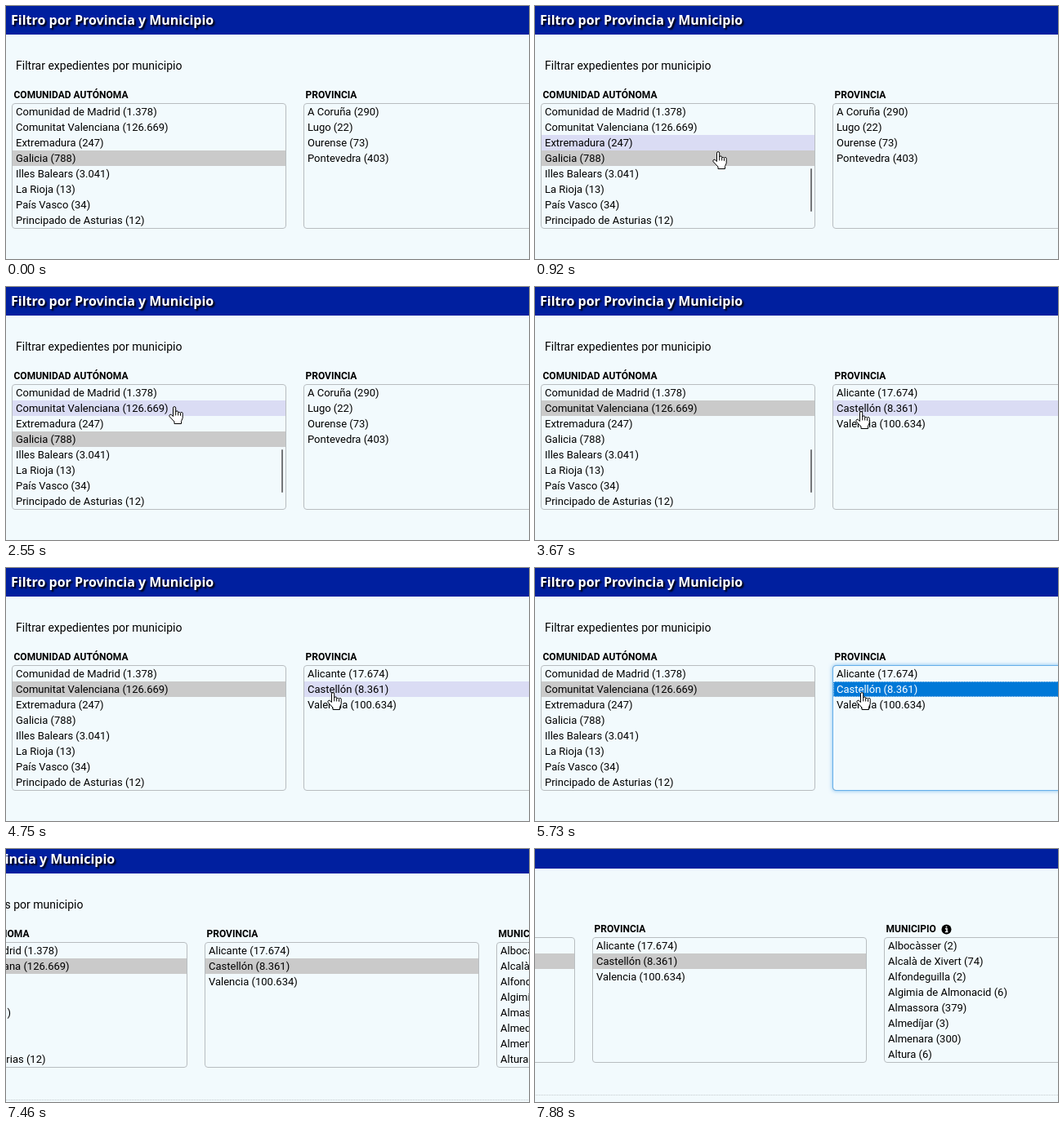
Animation, 640 px wide and 310 px high, one loop 8 s. Source, as an HTML page:

```html
<!DOCTYPE html>
<html lang="es">
<head>
<meta charset="utf-8">
<title>Filtro por Provincia y Municipio</title>
<style>
  :root { --hover: #dadcf4; --picked: #cacaca; --focus: #0078d7; }
  html, body { margin: 0; width: 100%; height: 100%; overflow: hidden; background: #f2fafd; }
  body { position: relative; font: 13px/19px Roboto, sans-serif; color: #000; }
  .stage { position: absolute; left: 0; top: 0; width: 640px; height: 310px; overflow: hidden; }
  .stage *, .stage { box-sizing: border-box; }
  .page, .page > *, .bar, .thumb, .options, .cursor, .cursor svg { position: absolute; }
  .page { left: 0; top: 0; width: 1100px; height: 340px; }

  header { left: 0; top: 0; width: 100%; height: 35px; background: #001f9f; }
  h1 { margin: 0; position: absolute; left: 6px; top: 6px; white-space: nowrap; color: #fff;
       font: bold 16px/22px "Open Sans", "Noto Sans", sans-serif; text-shadow: 2px 2px 2px #000; }
  .intro { margin: 0; left: 12px; top: 63px; font-size: 14px; line-height: 20px; white-space: nowrap; }
  .rule { left: 0; top: 312px; width: 100%; border-top: 1px dotted #c4cbce; }

  .field { top: 100px; width: 336px; }
  .field h2 { margin: 0 0 0 2.5px; font-size: 12px; line-height: 19px; font-weight: bold; white-space: nowrap; }
  .field h2 svg { position: absolute; left: 70px; top: 3px; }
  .list { position: relative; height: 154px; border: 1px solid #b8bdc0; border-radius: 4px; overflow: hidden; }
  .options { margin: 0; padding: 0 0 0 4px; left: 0; top: 0; list-style: none; white-space: nowrap; }
  .bar { left: 0; width: 100%; height: 19px; }
  .thumb { right: 3px; top: 79px; width: 2px; height: 53px; border-radius: 1px; background: #747678; }
  .glow { position: absolute; inset: 19px 0 0; border: 1px solid #66afe9; border-radius: 4px;
          box-shadow: 0 0 5px rgba(82, 168, 236, .75); }

  /* Every part shares one 8 s clock and changes in hard steps. */
  .anim { animation: 8s step-end -4ms infinite; }
  .page.anim { animation-name: pan; }
  .picked { top: 57px; background: var(--picked); animation-name: picked !important; }
  .hover { background: var(--hover); opacity: 0; animation-name: hover !important; }
  .thumb { opacity: 0; animation-name: thumb !important; }
  .before { animation-name: before !important; }
  .after { opacity: 0; animation-name: after !important; }
  .choice { top: 19px; outline: 1px dotted transparent; outline-offset: -1px; animation-name: choice !important; }
  .chosen { animation-name: chosen !important; }
  .glow { opacity: 0; animation-name: glow !important; }
  .cursor { left: 0; top: 0; animation-name: move !important; }
  .cursor svg { left: 0; top: 0; overflow: visible; fill: #fff; stroke: #000; stroke-linejoin: round; opacity: 0; }
  .arrow { animation-name: arrow !important; }
  .hand { animation-name: hand !important; }

  @keyframes pan {
    91.75%  { transform: translate(-53px, -2px); }
    93.25%  { transform: translate(-121px, -5px); }
    95.125% { transform: translate(-212px, -8px); }
    96.625% { transform: translate(-266px, -10px); }
    98.5%, 100% { transform: translate(-294px, -11px); }
  }
  @keyframes picked { 36.875%, 100% { top: 19px; } }
  @keyframes hover {
    10%     { opacity: 1; top: 38px; }
    13%     { opacity: 0; top: 38px; }
    28.125% { opacity: 1; top: 38px; }
    31.875% { opacity: 1; top: 19px; }
    36.875%, 100% { opacity: 0; top: 19px; }
  }
  @keyframes thumb {
    10%     { opacity: 1; }
    56.375% { opacity: .66; }
    57.875% { opacity: .33; }
    59.375%, 100% { opacity: 0; }
  }
  @keyframes before { 36.875%, 100% { opacity: 0; } }
  @keyframes after {
    40.625% { opacity: .6; }
    42.5%, 100% { opacity: 1; }
  }
  @keyframes choice {
    42.5%   { background: var(--hover); }
    70.125% { background: var(--focus); outline-color: #cfe3f5; }
    90%, 100% { background: var(--picked); outline-color: transparent; }
  }
  @keyframes chosen {
    70.125% { color: #fff; }
    90%, 100% { color: #000; }
  }
  @keyframes glow {
    70.125% { opacity: .5; }
    71.625% { opacity: 1; }
    90%, 100% { opacity: 0; }
  }
  @keyframes move {
    6.625%  { transform: translate(475px, 287px); }
    8.5%    { transform: translate(352px, 218px); }
    10%     { transform: translate(248px, 168px); }
    11.5%   { transform: translate(217px, 178px); }
    13%     { transform: translate(204px, 184px); }
    14.5%   { transform: translate(200px, 185px); }
    26.625% { transform: translate(199px, 178px); }
    28.125% { transform: translate(199px, 168px); }
    30%     { transform: translate(199px, 156px); }
    31.875% { transform: translate(199px, 146px); }
    36.875% { transform: translate(359px, 156px); }
    38.75%  { transform: translate(364px, 157px); }
    42.5%   { transform: translate(374px, 156px); }
    44%     { transform: translate(381px, 156px); }
    45.875% { transform: translate(392px, 152px); }
    56.375% { transform: translate(393px, 152px); }
    83.375% { transform: translate(560px, 76px); }
    85.25%, 100% { transform: translate(590px, 18px); }
  }
  @keyframes arrow {
    6.625%  { opacity: 1; }
    10%     { opacity: 0; }
    36.875% { opacity: 1; }
    42.5%   { opacity: 0; }
    83.375% { opacity: 1; }
    86.75%, 100% { opacity: 0; }
  }
  @keyframes hand {
    10%     { opacity: 1; }
    36.875% { opacity: 0; }
    42.5%   { opacity: 1; }
    83.375%, 100% { opacity: 0; }
  }
</style>
</head>
<body>
<div class="stage">
  <div class="page anim">
    <header><h1>Filtro por Provincia y Municipio</h1></header>
    <p class="intro">Filtrar expedientes por municipio</p>

    <section class="field" style="left:7px">
      <h2>COMUNIDAD AUTÓNOMA</h2>
      <div class="list">
        <div class="bar picked anim"></div>
        <div class="bar hover anim"></div>
        <ul class="options">
          <li>Comunidad de Madrid (1.378)</li>
          <li>Comunitat Valenciana (126.669)</li>
          <li>Extremadura (247)</li>
          <li>Galicia (788)</li>
          <li>Illes Balears (3.041)</li>
          <li>La Rioja (13)</li>
          <li>País Vasco (34)</li>
          <li>Principado de Asturias (12)</li>
        </ul>
        <div class="thumb anim"></div>
      </div>
    </section>

    <section class="field" style="left:364px">
      <h2>PROVINCIA</h2>
      <div class="list">
        <div class="bar choice anim"></div>
        <ul class="options before anim">
          <li>A Coruña (290)</li>
          <li>Lugo (22)</li>
          <li>Ourense (73)</li>
          <li>Pontevedra (403)</li>
        </ul>
        <ul class="options after anim">
          <li>Alicante (17.674)</li>
          <li class="chosen anim">Castellón (8.361)</li>
          <li>Valencia (100.634)</li>
        </ul>
      </div>
      <div class="glow anim"></div>
    </section>

    <section class="field" style="left:721px">
      <h2>MUNICIPIO
        <svg width="13" height="13"><circle cx="6.5" cy="6.5" r="6"/><path d="M5 5.8h2v3.7M4.8 9.5h3.6M5.7 3.4h1.6" fill="none" stroke="#fff" stroke-width="1.5"/></svg>
      </h2>
      <div class="list">
        <ul class="options">
          <li>Albocàsser (2)</li>
          <li>Alcalà de Xivert (74)</li>
          <li>Alfondeguilla (2)</li>
          <li>Algimia de Almonacid (6)</li>
          <li>Almassora (379)</li>
          <li>Almedíjar (3)</li>
          <li>Almenara (300)</li>
          <li>Altura (6)</li>
        </ul>
      </div>
    </section>

    <div class="rule"></div>
  </div>

  <div class="cursor anim">
    <svg class="arrow anim" width="12" height="19"><path d="M.5.8V16.5L4.2 13l2.6 5.5 2.2-1L6.5 12h5Z"/></svg>
    <svg class="hand anim" width="18" height="23">
      <path d="M5.5 12.5V2.2a1.6 1.6 0 0 1 3.2 0V7.4a1.5 1.5 0 0 1 3 0V8.2a1.5 1.5 0 0 1 2.8.3a1.4 1.4 0 0 1 2.7.8v5.2l-1.7 4v3H7V19L1.2 12.8a1.6 1.6 0 0 1 2-2.4Z"/>
      <path d="M8.7 7.4v4M11.7 8v3.5M14.5 8.8v3" fill="none"/>
    </svg>
  </div>
</div>
</body>
</html>
```
